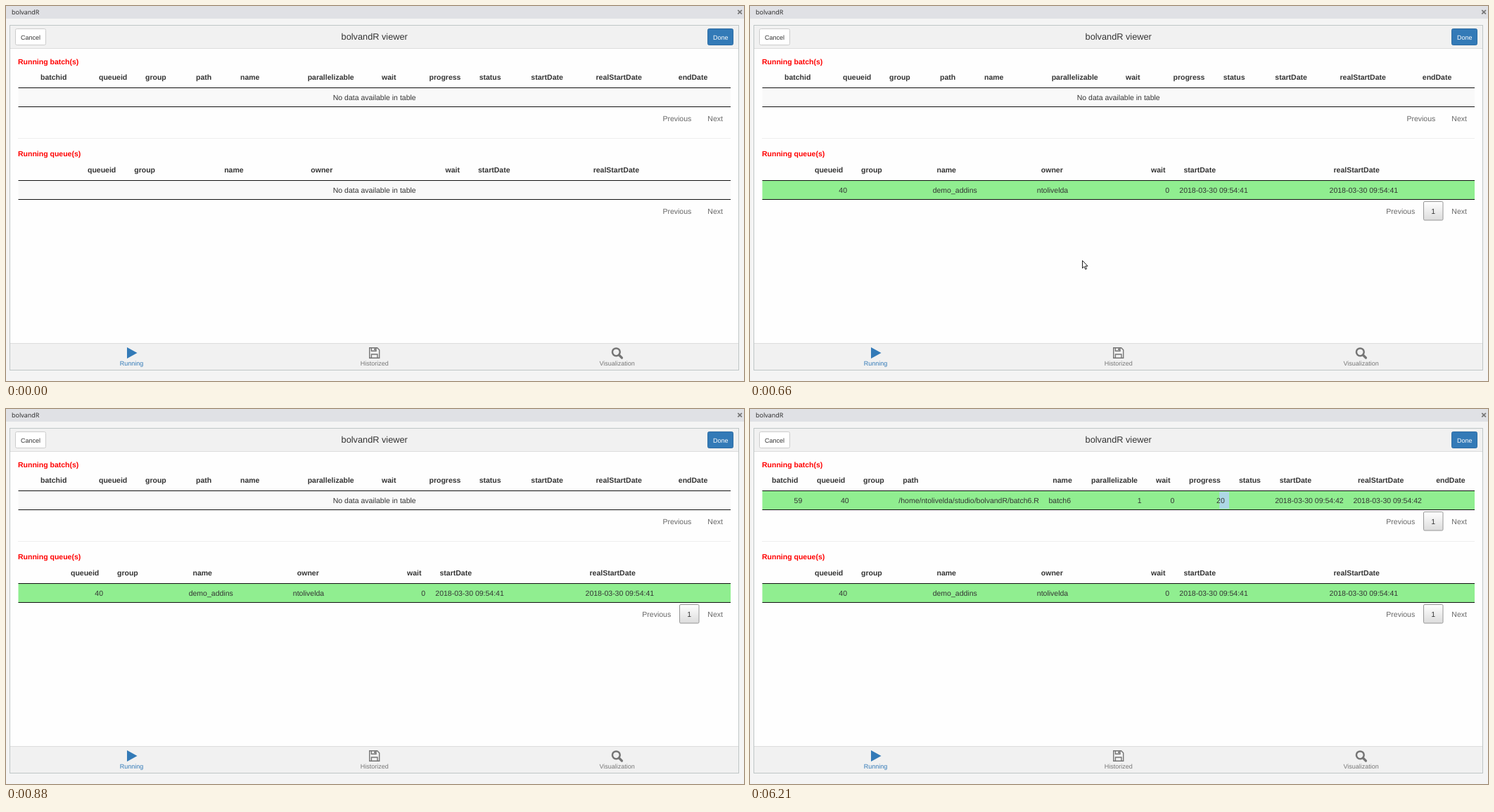
An HTML page that plays this animation: 1049 by 534 pixels, repeating every 8 s.

```html
<!DOCTYPE html>
<html lang="en">
<head>
<meta charset="utf-8">
<title>Batch viewer</title>
<style>
  html, body { margin: 0; width: 100%; height: 100%; overflow: hidden; background: #f4f4f4; }
  svg { display: block; width: 1049px; height: 534px; }
  text {
    font: 10.5px "Liberation Sans", Arial, sans-serif;
    fill: #333;
    text-rendering: geometricPrecision;
    white-space: pre;
  }
  .head { font-weight: bold; }
  .section { font-weight: bold; fill: #f00; }
  .page { fill: #666; }
  .small { font-size: 9px; }
  .title { font-size: 12.75px; }
  .bar { font: 9px "Open Sans", "Noto Sans", sans-serif; fill: #222; }
  .mid { text-anchor: middle; }
  .end { text-anchor: end; }
  .blue { fill: #337ab7; }
  .grey { fill: #777; }
  .white { fill: #fff; }

  .anim { animation: 8s step-end infinite; visibility: hidden; }
  #queueEmpty { animation-name: queueEmpty; }
  #queueFull { animation-name: queueFull; }
  #batchEmpty { animation-name: batchEmpty; }
  #batchFull { animation-name: batchFull; }
  #step0 { animation-name: step0; }
  #step10 { animation-name: step10; }
  #step20 { animation-name: step20; }
  #cursor { animation-name: cursor; }

  @keyframes queueEmpty { 0% { visibility: visible } 4.125%, 100% { visibility: hidden } }
  @keyframes queueFull { 0% { visibility: hidden } 4.125%, 100% { visibility: visible } }
  @keyframes batchEmpty { 0% { visibility: visible } 27.375%, 100% { visibility: hidden } }
  @keyframes batchFull { 0% { visibility: hidden } 27.375%, 100% { visibility: visible } }
  @keyframes step0 { 0% { visibility: hidden } 27.375% { visibility: visible } 53.125%, 100% { visibility: hidden } }
  @keyframes step10 { 0% { visibility: hidden } 53.125% { visibility: visible } 77.625%, 100% { visibility: hidden } }
  @keyframes step20 { 0% { visibility: hidden } 77.625%, 100% { visibility: visible } }
  @keyframes cursor {
    0% { visibility: hidden; transform: translate(9px, 370px) }
    5.5% { visibility: visible; transform: translate(9px, 370px) }
    6.875% { visibility: visible; transform: translate(240px, 366px) }
    8.25% { visibility: visible; transform: translate(472px, 362px) }
    9.75% { visibility: visible; transform: translate(740px, 358px) }
    11%, 100% { visibility: hidden; transform: translate(740px, 358px) }
  }
</style>
</head>
<body>
<svg viewBox="0 0 1049 534">
  <defs>
    <linearGradient id="shade" x2="0" y2="1">
      <stop stop-color="#fff"/><stop offset="1" stop-color="#dcdcdc"/>
    </linearGradient>
  </defs>

  <!-- window -->
  <rect width="1049" height="534" fill="#f4f4f4"/>
  <rect width="1049" height="18" fill="#e0e1e5"/>
  <text class="bar" x="8" y="12">bolvandR</text>
  <path d="M1040.3 5.8l5.6 5.6m0-5.6l-5.6 5.6" stroke="#777" stroke-width="1.7"/>
  <rect x="5.5" y="27.5" width="1036" height="491" fill="#fefefe" stroke="#bfc6c6"/>

  <!-- title bar -->
  <rect x="6" y="28" width="1035" height="32" fill="#f1f1f1"/>
  <rect x="6" y="60" width="1035" height="1" fill="#ddd"/>
  <rect x="13.5" y="32.5" width="43" height="23" rx="2" fill="#fff" stroke="#ccc"/>
  <rect x="997.5" y="32.5" width="36" height="23" rx="2" fill="#337ab7" stroke="#2e6da4"/>
  <text class="small mid" x="35" y="48">Cancel</text>
  <text class="small mid white" x="1015.7" y="48">Done</text>
  <text class="title mid" x="523.7" y="48">bolvandR viewer</text>

  <!-- content -->
  <text class="section" x="17" y="83">Running batch(s)</text>
  <text class="section" x="17" y="214">Running queue(s)</text>
  <rect x="17" y="188" width="1013" height="1" fill="#eee"/>
  <g id="batchEmpty" class="anim"></g>
  <g id="batchFull" class="anim"></g>
  <g id="step0" class="anim"></g>
  <g id="step10" class="anim"></g>
  <g id="step20" class="anim"></g>
  <g id="queueEmpty" class="anim"></g>
  <g id="queueFull" class="anim"></g>

  <!-- tabs -->
  <rect x="6" y="480" width="1035" height="38" fill="#f1f1f1"/>
  <rect x="6" y="480" width="1035" height="1" fill="#ddd"/>
  <path class="blue" d="M172 486l14.5 8-14.5 8z"/>
  <g fill="none" stroke="#757575">
    <path stroke-width="1.4" d="M516.7 486.7h11l3 3v11.6h-14zM519.4 501v-5h8.6v5M519.4 487v4.3h6.6v-4.3"/>
    <path stroke-width="2.2" d="M524.3 487.5v2.6"/>
    <circle cx="867.3" cy="492.8" r="5.4" stroke-width="2.5"/>
    <path d="M871.4 497l4 4" stroke-width="3.2" stroke-linecap="round"/>
  </g>
  <text class="small mid blue" x="178.5" y="512">Running</text>
  <text class="small mid grey" x="523.7" y="512">Historized</text>
  <text class="small mid grey" x="868.7" y="512">Visualization</text>

  <path id="cursor" class="anim" d="M.5.5v10.8l2.5-2.3 1.8 4 1.7-.7-1.8-4h3.3z" fill="#fff" stroke="#222"/>
</svg>
<script>
  const $ = id => document.getElementById(id);

  function add(parent, tag, attrs, label = "") {
    const el = document.createElementNS("http://www.w3.org/2000/svg", tag);
    for (const key in attrs) el.setAttribute(key, attrs[key]);
    el.textContent = label;
    parent.append(el);
  }

  const write = (g, x, y, label, cls = "") => add(g, "text", { x, y, class: cls }, label);
  const box = (g, x, y, width, height, fill) => add(g, "rect", { x, y, width, height, fill });

  // One table: header, a single row and its pager; `top` is the header rule.
  function table(id, top, heads, cells) {
    const g = $(id), base = top + 18, pager = top + 48;
    for (const name in heads) write(g, heads[name], top - 11, name, "head");
    box(g, 17.5, top, 1012.5, 28, cells ? "#90ee90" : "#f9f9f9");
    box(g, 17.5, top, 1012.5, 1, "#111");
    box(g, 17.5, top + 27, 1012.5, 1, "#111");
    write(g, 997.3, pager, "Next", "page");
    write(g, cells ? 904.3 : 933.4, pager, "Previous", "page");
    if (!cells) return write(g, 523.7, base, "No data available in table", "mid");
    for (const [x, label, cls] of cells) write(g, x, base, label, cls);
    add(g, "rect", { x: 957.5, y: top + 30.5, width: 27.5, height: 26.5, rx: 1.5,
                     fill: "url(#shade)", stroke: "#979797" });
    write(g, 971.2, pager, "1", "mid");
  }

  const user = "ntolivelda";
  const day = "2018-03-30 09:54:";

  table("batchEmpty", 116, {
    batchid: 49, queueid: 132, group: 198, path: 270, name: 333, parallelizable: 428.7,
    wait: 534, progress: 601.5, status: 672.7, startDate: 746.3, realStartDate: 838.5, endDate: 955.8
  });
  table("batchFull", 116, {
    batchid: 31, queueid: 95, group: 161, path: 217.3, name: 430.3, parallelizable: 485,
    wait: 577, progress: 624, status: 695, startDate: 752.7, realStartDate: 864, endDate: 975.2
  }, [
    [74.3, "59", "end"], [140.7, "40", "end"],
    [211.3, `/home/${user}/studio/bolvandR/batch6.R`], [424.5, "batch6"],
    [556.6, "1", "end"], [603.4, "0", "end"],
    [746.2, day + "42"], [857.4, day + "42"]
  ]);
  table("queueEmpty", 248, {
    queueid: 116, group: 182.3, name: 310.2, owner: 433.3, wait: 624.5, startDate: 671, realStartDate: 834.7
  });
  table("queueFull", 248, {
    queueid: 92, group: 158, name: 265.5, owner: 413.8, wait: 570, startDate: 616.5, realStartDate: 829.5
  }, [
    [138, "40", "end"], [259.7, "demo_addins"], [407.8, user], [596.2, "0", "end"],
    [610.3, day + "41"], [823.6, day + "41"]
  ]);

  for (const percent of [0, 10, 20]) {
    const g = $("step" + percent), width = percent * 0.69;
    box(g, 681 - width, 118, width, 24, "#add8e6");
    write(g, 674.8, 134, percent, "end");
  }
</script>
</body>
</html>
```
